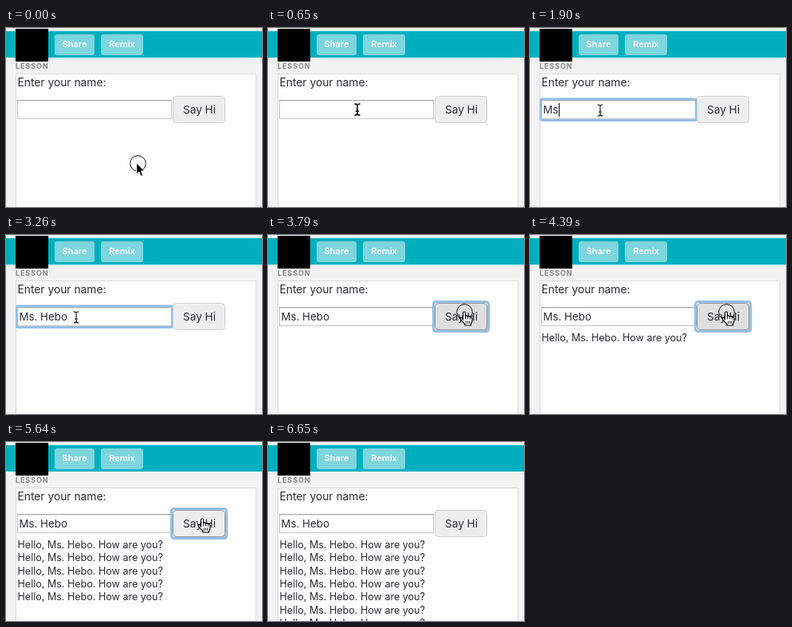
These frames come from a looping animation (321x224 px, 6.75 s). An HTML page:

```html
<!DOCTYPE html>
<html lang="en">
<head>
<meta charset="utf-8">
<title>Say Hi demo</title>
<style>
  html, body { margin: 0; width: 100%; height: 100%; overflow: hidden; background: #f2f2f2; }
  svg { display: block; width: 321px; height: 224px; font-family: Inter, "Open Sans", sans-serif; }
  text { fill: #2b2b33; white-space: pre; }
  .nav text { fill: #fff; font-size: 11px; font-weight: 600; text-anchor: middle; }
  .nav rect { fill: #7dd5de; }
  .ring { fill: none; stroke: #94bfe6; stroke-width: 3; }
  .cursor path { stroke-linejoin: round; stroke-linecap: round; }
</style>
</head>
<body>
<svg viewBox="0 0 321 224">
  <defs>
    <filter id="soft" x="-20%" y="-30%" width="140%" height="160%"><feGaussianBlur stdDeviation="1.5"/></filter>
  </defs>
  <rect width="321" height="224" fill="#f2f2f2"/>
  <rect y="4" width="321" height="33" fill="#00afbe"/>
  <rect x="12" y="1" width="41" height="41" fill="#000"/>
  <text x="12" y="51" font-size="9" font-weight="700" letter-spacing=".9" style="fill:#858585">LESSON</text>
  <g class="nav">
    <rect x="61" y="8" width="50" height="26" rx="3"/><text x="86" y="24">Share</text>
    <rect x="119" y="8" width="53" height="26" rx="3"/><text x="145.500" y="24">Remix</text>
  </g>
  <rect x="12.500" y="57.500" width="301" height="180" fill="#fefefe" stroke="#dcdcdc"/>
  <text x="14.500" y="73" font-size="13.800">Enter your name:</text>

  <rect x="14.500" y="90.500" width="193" height="23" fill="#fff" stroke="#c8c8c8"/>
  <path d="M15 91.500H207" stroke="#e3e3e3"/>
  <path d="M14 90.500H208" stroke="#aaa"/>
  <rect id="inputRing" class="ring" x="13.500" y="89" width="195" height="26.500" rx="1.500"/>
  <text id="name" x="16.500" y="107" font-size="13.300"></text>
  <rect id="caret" y="94" width="1" height="17" fill="#000"/>

  <rect id="shadow" x="211" y="88" width="66" height="33" rx="4" fill="#000" opacity=".3" filter="url(#soft)"/>
  <rect id="button" x="209.500" y="85.500" width="65" height="33" rx="4"/>
  <rect id="buttonRing" class="ring" x="207.500" y="83.500" width="69" height="37" rx="3"/>
  <text x="242.500" y="107" font-size="13.600" text-anchor="middle">Say Hi</text>
  <g id="greetings" font-size="12.550"></g>

  <g id="pointer" class="cursor">
    <circle id="ripple" cx=".5" cy=".5" r="9.800" fill="none" stroke="#111"/>
    <g id="arrow">
      <path d="M-1.500 0V14L1.800 11L4.200 16.500L6.800 15.400L4.400 10H8.500Z" fill="#000" stroke="#fff"/>
    </g>
    <g id="ibeam" fill="none">
      <path d="M-3-7Q0-7 0-5V5Q0 7-3 7M3-7Q0-7 0-5V5Q0 7 3 7M-1.500 2H1.500" stroke="#fff" stroke-width="3"/>
      <path id="beam" d="M-3-7Q0-7 0-5V5Q0 7-3 7M3-7Q0-7 0-5V5Q0 7 3 7M-1.500 2H1.500" stroke="#111"/>
    </g>
    <g id="hand">
      <path d="M-1.500 10V1.500Q-1.500 0 0 0T1.500 1.500V6Q1.700 4.800 3 4.900T4.500 6.500Q4.700 5.500 6 5.700T7.400 7.200Q8 6.300 9 6.800T10 8.500V11Q10 13 8.500 15V17H1V15.500Q-2 13-4.500 9.500Q-5.500 8-4.300 7.400T-1.500 10Z" fill="#fff" stroke="#000" stroke-width="1.200"/>
      <path d="M1.500 6V9M4.500 6.500V9M7.400 7.200V9.500M2.500 12V14.500M4.500 12V14.500M6.500 12V14.500" stroke="#000" stroke-width=".8"/>
    </g>
  </g>
</svg>
<script>
const LOOP = 6750;
const NAME = "Ms. Hebo";
const el = id => document.getElementById(id);

// Key times of each change
const typedAt = [1660, 1900, 2080, 2130, 2370, 2490, 2600, 2720];
const greetedAt = [3800, 4510, 5110, 5340, 5580, 5820, 5940];
const pressed = [[0, 60], [880, 1000], [3740, 3910], [4390, 4570], [4990, 5170],
                 [5290, 5340], [5520, 5640], [5760, 5880]];
const moves = [
  [0, 165, 169, "arrow"], [360, 160, 162, "arrow"], [430, 148, 146, "arrow"],
  [500, 134, 127, "arrow"], [560, 122, 112, "ibeam"], [610, 115, 104, "ibeam"],
  [650, 112, 102, "ibeam"], [700, 98, 102, "ibeam"], [760, 88, 103, "ibeam"],
  [3380, 135, 104, "ibeam"], [3440, 218, 99, "hand"], [3500, 246, 96, "hand"],
  [5940, 262, 130, "arrow"], [6000, 296, 190, "arrow"], [6050, 0, 0, "none"]
];

const within = (t, from, to) => t >= from && t < to;
const show = (id, on) => el(id).setAttribute("visibility", on ? "visible" : "hidden");
const passed = (times, t) => times.filter(at => at <= t).length;

const lines = greetedAt.map((_, i) => {
  const line = document.createElementNS("http://www.w3.org/2000/svg", "text");
  line.setAttribute("x", 14.5);
  line.setAttribute("y", 132.7 + i * 16.4);
  line.textContent = `Hello, ${NAME}. How are you?`;
  el("greetings").append(line);
  return line;
});

function render(t) {
  const typed = passed(typedAt, t);
  const name = el("name");
  name.textContent = NAME.slice(0, typed);
  el("caret").setAttribute("x", 17 + (typed ? Math.round(name.getComputedTextLength()) : 0));
  show("caret", within(t, 880, 1420) || within(t, 1660, 3260));
  show("inputRing", within(t, 880, 3740));

  const [, x, y, kind] = moves.filter(m => m[0] <= t).pop();
  const down = pressed.some(([from, to]) => within(t, from, to));
  const focused = within(t, 3740, 6650);
  const hovered = kind === "hand";
  const button = el("button");
  button.setAttribute("fill", down && hovered ? "#dfdfdf" : "#eee");
  button.setAttribute("stroke", focused ? "#999" : "#d0d0d0");
  show("buttonRing", focused);
  show("shadow", hovered);

  const greeted = passed(greetedAt, t);
  lines.forEach((line, i) => line.setAttribute("visibility", i < greeted ? "visible" : "hidden"));

  el("pointer").setAttribute("transform", `translate(${x} ${y})`);
  for (const shape of ["arrow", "ibeam", "hand"]) show(shape, kind === shape);
  show("ripple", down);
  el("beam").setAttribute("stroke-width", t < 1660 ? 1.7 : 1.1);
}

const start = performance.now();
function tick() {
  render((performance.now() - start) % LOOP);
  requestAnimationFrame(tick);
}
tick();
</script>
</body>
</html>
```
